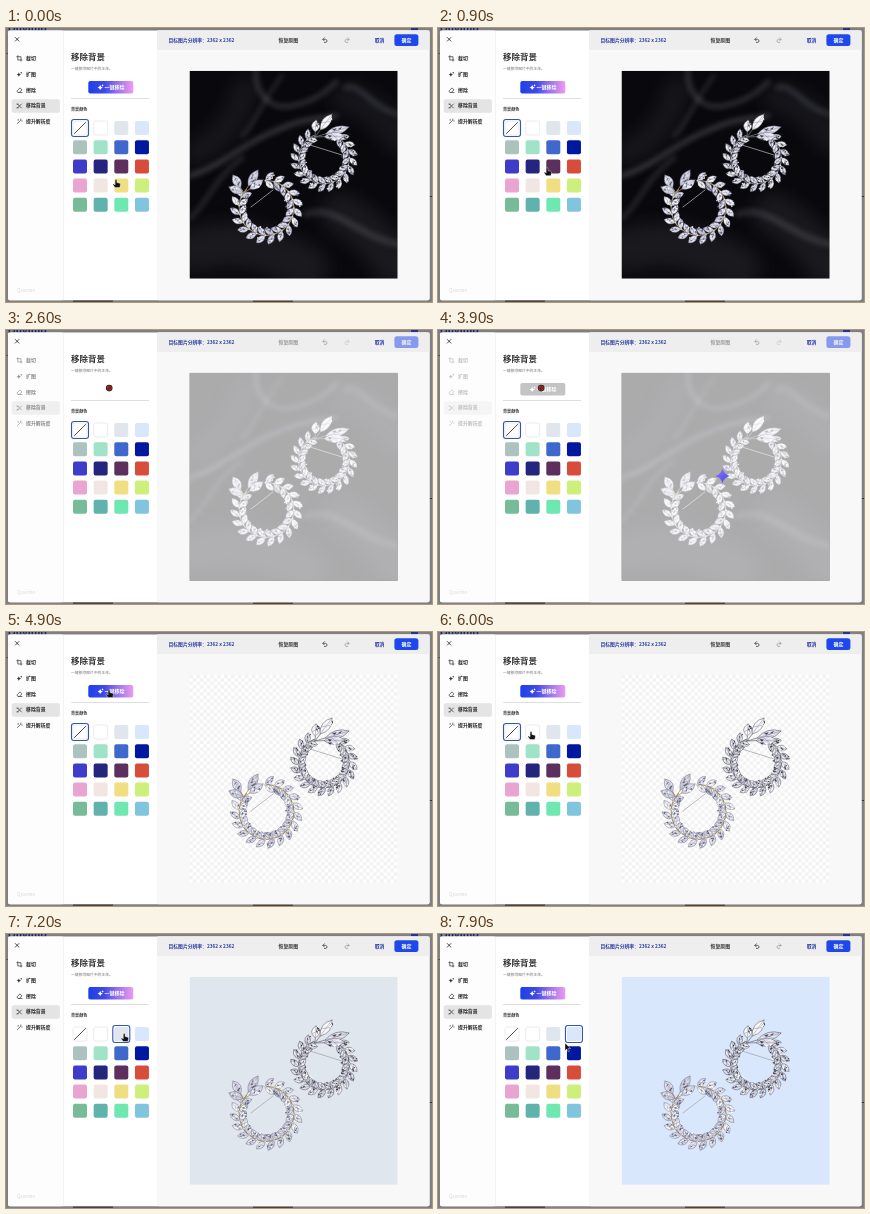
Recreate the animation shown at these times as an HTML page. Size 426 by 274 pixels, loop 8 s.

```html
<!DOCTYPE html>
<html lang="zh-CN">
<head>
<meta charset="utf-8">
<style>
html, body { margin: 0; width: 100%; height: 100%; overflow: hidden; background: #808080; }
svg { display: block; width: 100vw; height: 100vh; }
text { font-family: "Noto Sans CJK SC", "Noto Sans CJK", "Noto Sans", sans-serif; }
</style>
</head>
<body>
<svg id="stage" viewBox="0 0 426 274"></svg>
<script>
const LOOP = 8000;
const BUSY = [2500, 4600];
const COLORS = ['none', '#ffffff', '#e0e6ee', '#d9e7fc',
  '#acc2be', '#a0e3c8', '#3f68cc', '#0018a0',
  '#3d3dca', '#25257f', '#5c2f5f', '#d84c3a',
  '#e9a5cf', '#f1e6e2', '#f0de83', '#cdef7c',
  '#78bb98', '#60b3ad', '#6ee8b0', '#80c4de'];
// time, chosen swatch
const PICKS = [[0, 0], [6200, 1], [7100, 2], [7500, 3]];
// time, x, y of the pointer tip
const POINTER = [[0, 110, 151.5], [700, 110, 151.5], [1600, 103, 57.5], [5200, 103, 57.5],
  [6000, 93, 99.5], [6400, 93, 99.5], [6800, 113, 99.5], [7100, 113, 99.5],
  [7400, 133, 99.5], [7600, 133, 99.5], [7900, 127, 109]];

let seed = 7;
const rand = () => (seed = (seed * 16807) % 2147483647) / 2147483647;
const rad = d => d * Math.PI / 180;
const rect = (x, y, w, h, fill, r = 0, more = '') =>
  `<rect x="${x}" y="${y}" width="${w}" height="${h}" fill="${fill}" rx="${r}" ${more}/>`;
const photo = (fill, more = '') => rect(183.5, 42.8, 208.2, 207.9, fill, 0, more);
const label = (s, x, y, size, fill = '#333', weight = 700) =>
  `<text x="${x}" y="${y + size * .37}" font-size="${size}" fill="${fill}" font-weight="${weight}">${s}</text>`;
const line = (d, color = '#333', w = .7, more = '') =>
  `<path d="${d}" fill="none" stroke="${color}" stroke-width="${w}" stroke-linecap="round" stroke-linejoin="round" ${more}/>`;
const star = (x, y, r, fill) => {
  const q = r * .2;
  return `<path transform="translate(${x} ${y})" fill="${fill}" d="M0 ${-r}Q${q} ${-q} ${r} 0Q${q} ${q} 0 ${r}Q${-q} ${q} ${-r} 0Q${-q} ${-q} 0 ${-r}Z"/>`;
};

// A marquise stone with random facets
function leaf(x, y, angle, len, wide, dark) {
  const body = `M0 0Q${len / 2} ${-wide} ${len} 0Q${len / 2} ${wide} 0 0Z`;
  const tone = ['#e6e6f0', '#f6f6fa', '#cfcfde', '#dcdcec'][Math.floor(rand() * 4)];
  let out = `<path d="${body}" fill="${tone}" stroke="${dark}" stroke-width=".4"/>`;
  for (let i = 0; i < 7; i++) {
    const u = len * (.15 + rand() * .6), v = wide * (rand() - .5) * .6;
    const fill = rand() < .5 ? '#fff' : dark;
    out += `<path d="M${u} ${v}l${len * .2} ${wide * (rand() - .5) * .4}l${-len * .1} ${wide * .25}Z" fill="${fill}" opacity=".9"/>`;
  }
  out += line(`M${len * .1} 0H${len * .9}M${len * .35} ${-wide * .35}L${len * .65} ${wide * .35}`, dark, .25);
  return `<g transform="translate(${x} ${y}) rotate(${angle})">${out}</g>`;
}

function wreath({ cx, cy, r, from, to, len, dark, stem, root, tips, pin }) {
  const at = a => [cx + r * Math.cos(rad(a)), cy + r * Math.sin(rad(a))];
  let out = line(`M${at(from)}A${r} ${r} 0 1 1 ${at(to)}L${root}`, stem, 1.2) + line(pin, '#a9a9ae', .8);
  const count = 17;
  for (let i = 0; i < count; i++) {
    const a = from + (to - from) * i / count, [x, y] = at(a);
    out += leaf(x, y, a + 46, len, len * .52, dark);
    out += leaf(x, y, a + 136, len * .95, len * .5, dark);
    out += `<circle cx="${x}" cy="${y}" r=".9" fill="#eee" stroke="${stem}" stroke-width=".4"/>`;
  }
  for (const [x, y] of tips) {
    const dx = x - root[0], dy = y - root[1], size = Math.hypot(dx, dy);
    const k = size > 17 ? .3 : .08;
    out += line(`M${root}L${x} ${y}`, stem, .8);
    out += leaf(root[0] + dx * k, root[1] + dy * k, Math.atan2(dy, dx) * 180 / Math.PI, size * (1 - k), 8.2, dark);
  }
  return out;
}

const jewels = () => wreath({
  cx: 318, cy: 130.5, r: 25.2, from: -55, to: 246, len: 11, dark: '#34343f', stem: '#77777f',
  root: [309, 109], tips: [[326, 86], [343, 99], [310, 92], [339, 108]],
  pin: 'M304 117L336 127'
}) + wreath({
  cx: 260.5, cy: 180, r: 27.3, from: -92, to: 222, len: 11.6, dark: '#5c5c72', stem: '#a8906a',
  root: [238, 165], tips: [[252, 142], [227, 147], [257, 152], [223, 159]],
  pin: 'M245 179L267 162'
});

// path, width, opacity: broad sheen, then narrow ridges
const SHEEN = [
  ['M190 222Q240 205 300 240', 44, .09],
  ['M335 185Q365 200 391 240', 40, .09],
  ['M190 125Q225 110 240 60', 26, .07],
  ['M340 70Q370 75 391 110', 30, .07]];
const RIDGES = [
  ['M184 148C215 138 235 118 262 106S295 92 330 88', 5, .22],
  ['M236 108C252 92 258 70 276 48', 4, .14],
  ['M250 43C248 62 262 82 284 78S318 66 330 54', 5, .18],
  ['M184 190C200 178 208 150 236 130', 5, .14],
  ['M340 60C352 52 365 80 391 86', 6, .14],
  ['M300 186C330 176 345 205 391 216', 7, .14]];
const folds = (list, blur) => `<g filter="url(#${blur})">` +
  list.map(([d, w, o]) => line(d, '#c4c4d4', w, `opacity="${o}"`)).join('') + '</g>';
const silk = () => photo('#09090d') + folds(SHEEN, 'soft') + folds(RIDGES, 'fine');

const ICONS = [
  line('M11.8 27.7V32H16M10.8 28.7H15V33'),
  star(12.8, 46.6, 2.2, '#333') + star(15.2, 44.8, 1.1, '#333'),
  line('M11.2 62.7L14 59.9L16 61.9L13.2 64.5H12.3ZM13 64.5H16'),
  line('M11.5 76L15.5 80M15.5 76L11.5 80M11 76.2H12.3M11 79.8H12.3'),
  line('M11.5 95.5L14.2 92.7M14.8 91V92.2M15.8 93H16.2M12.2 91.5V92.3')];
const MENU = ['裁切', '扩图', '擦除', '移除背景', '提升解析度'];
const menuY = i => 30.4 + i * 15.75;

const swatchAt = i => [67 + (i % 4) * 20.65, 93 + Math.floor(i / 4) * 19.2];
const swatches = () => COLORS.map((c, i) => {
  const [x, y] = swatchAt(i);
  const edge = i < 2 ? 'stroke="#dedee2" stroke-width=".6"' : '';
  return rect(x, y, 14, 14, i ? c : '#fff', 2, edge) +
    (i ? '' : line(`M${x + 1.5} ${y + 12.5}L${x + 12.5} ${y + 1.5}`, '#222', .8));
}).join('');

const button = (id, fill) => `<g id="${id}">` + rect(82.3, 53, 45, 12.5, fill, 2) +
  star(94.2, 59.5, 2.6, '#fff') + star(96.6, 57.4, 1.1, '#fff') +
  label('一键移除', 98.5, 59.1, 5, '#fff') + '</g>';

const stage = document.getElementById('stage');
stage.innerHTML = `
<defs>
  <linearGradient id="glow"><stop offset="0" stop-color="#1c40e8"/><stop offset=".35" stop-color="#3f48e8"/><stop offset=".62" stop-color="#8f70ea"/><stop offset="1" stop-color="#f09aee"/></linearGradient>
  <linearGradient id="spark" x2="1" y2="1"><stop offset="0" stop-color="#a070f0"/><stop offset="1" stop-color="#2f4cf0"/></linearGradient>
  <filter id="soft" x="-40%" y="-40%" width="180%" height="180%"><feGaussianBlur stdDeviation="9"/></filter>
  <filter id="fine" x="-20%" y="-20%" width="140%" height="140%"><feGaussianBlur stdDeviation="2.6"/></filter>
  <clipPath id="frame">${photo('#000')}</clipPath>
  <pattern id="check" x="183.5" y="42.8" width="6.93" height="6.93" patternUnits="userSpaceOnUse">
    ${rect(0, 0, 6.93, 6.93, '#fff') + rect(0, 0, 3.465, 3.465, '#f2f2f2') + rect(3.465, 3.465, 3.465, 3.465, '#f2f2f2')}
  </pattern>
</defs>
${rect(0, 0, 426, 274, '#808080')}
${label('Quvimo', 2, .2, 10, '#17256f')}
${rect(405, 0, 7, 3, '#22368f')}
${rect(67, 271, 40, 3, '#4b4542') + rect(247, 271, 40, 3, '#4d4338')}
${rect(0, 25, 2, 1, '#555') + rect(423, 168, 3, 1, '#333')}
${rect(2, 2.5, 421.5, 269.8, '#fff', 2)}
${rect(2, 2.5, 55.5, 269.8, '#fdfdfd', 2) + rect(57, 2.5, .6, 269.8, '#ececec')}
${rect(151, 2.5, 272.5, 269.8, '#f8f8f8', 2) + rect(151, 2.5, 272.5, 19.5, '#eeeeef')}
${line('M9.3 9.5L12.9 13.1M12.9 9.5L9.3 13.1', '#222', .8)}
<g id="menu">
  ${rect(5.7, 71.2, 48.2, 13.6, '#e4e4e4', 2)}
  ${MENU.map((s, i) => ICONS[i] + label(s, 20, menuY(i), 4.9, '#222')).join('')}
</g>
${label('Quvimo', 11, 262, 5, '#d8d8d8', 400)}
${label('移除背景', 65, 29.3, 8.5)}
${label('一键移除图片中的主体。', 65, 40.3, 3.8, '#777', 400)}
${button('ready', 'url(#glow)') + button('off', '#c4c4c4')}
${rect(65, 70, 78, 1, '#dedede')}
${label('背景颜色', 65, 81.8, 4.1)}
${swatches()}
<rect id="ring" width="17" height="17" rx="2.5" fill="none" stroke="#3454b8" stroke-width="1.1"/>
${label('目标图片分辨率：2362 x 2362', 162.5, 12, 4.8, '#2b3da4')}
<g id="tools">
  ${label('恢复原图', 272.5, 12, 4.9)}
  ${line('M318.5 9.7L316.8 11.4L318.5 13.1M317 11.4H319.8A1.6 1.6 0 0 1 319.8 14.5H318.5')}
  ${line('M341.5 9.7L343.2 11.4L341.5 13.1M343 11.4H340.2A1.6 1.6 0 0 0 340.2 14.5H341.5', '#999')}
</g>
${label('取消', 368.7, 12, 4.9, '#2b3da4')}
<g id="confirm">${rect(388.4, 6.2, 24, 11.8, '#1f48ea', 2.5) + label('确定', 395.4, 12, 5, '#fff')}</g>
<g clip-path="url(#frame)">
  ${photo('#fff', 'id="back"')}
  <g id="silk">${silk()}</g>
  ${jewels()}
  ${photo('#fff', 'id="veil"')}
</g>
<g id="spinner">${star(0, 0, 7.2, 'url(#spark)') + star(4, -8, 2, '#d9b6ee')}</g>
<g id="cursor">
  <path id="hand" d="M-.9 .6Q0 -.6 .9 .6V3L3.6 3.7Q4.6 4 4.4 5.4L3.7 8H-1L-3 5.2Q-3.2 4.2 -2.1 4.5L-.9 5.4Z" fill="#111" stroke="#fff" stroke-width=".4"/>
  <path id="arrow" d="M0 0V7.6L1.9 6L3.2 8.8L4.5 8.2L3.2 5.5H5.6Z" fill="#111" stroke="#fff" stroke-width=".4"/>
  <g id="stop"><circle cx=".2" cy=".6" r="3.3" fill="#2b1614"/><circle cx=".2" cy=".6" r="2.2" fill="#46201d" stroke="#b5332c" stroke-width=".9"/>${line('M-1.3 -.9L1.7 2.1', '#b5332c', .9)}</g>
</g>`;

const $ = id => document.getElementById(id);
const set = (id, attrs) => { for (const k in attrs) $(id).setAttribute(k, attrs[k]); };
const show = (id, on) => set(id, { opacity: +on });
const clamp = v => Math.max(0, Math.min(1, v));
const ease = u => u * u * (3 - 2 * u);

function pointerAt(t) {
  let i = 0;
  while (i < POINTER.length - 2 && t >= POINTER[i + 1][0]) i++;
  const [t0, x0, y0] = POINTER[i], [t1, x1, y1] = POINTER[i + 1];
  const u = ease(clamp((t - t0) / (t1 - t0)));
  return [x0 + (x1 - x0) * u, y0 + (y1 - y0) * u];
}

function overTarget(x, y) {
  if (x > 82 && x < 128 && y > 52 && y < 66) return true;
  return COLORS.some((c, i) => {
    const [sx, sy] = swatchAt(i);
    return x >= sx && x <= sx + 14 && y >= sy && y <= sy + 14;
  });
}

function draw(t) {
  const busy = t >= BUSY[0] && t < BUSY[1];
  const done = t >= BUSY[1];
  const since = t - BUSY[0];
  show('ready', !busy);
  set('off', { opacity: busy ? clamp((since - 100) / 300) : 0 });
  set('menu', { opacity: busy ? 1 - .72 * clamp((since + 100) / 300) : 1 });
  set('tools', { opacity: busy ? .45 : 1 });
  set('confirm', { opacity: busy ? .5 : 1 });
  set('veil', { opacity: busy ? .66 : 0 });
  show('silk', !done);

  const pulse = 1 + .15 * Math.sin((t - 3900) / 1000 * Math.PI * 2);
  set('spinner', {
    opacity: busy ? clamp((since - 200) / 300) : 0,
    transform: `translate(284.5 146) scale(${pulse})`
  });

  const pick = PICKS.filter(p => t >= p[0]).pop()[1];
  const [sx, sy] = swatchAt(pick);
  set('ring', { x: sx - 1.5, y: sy - 1.5 });
  set('back', { fill: pick ? COLORS[pick] : 'url(#check)' });

  const [x, y] = pointerAt(t), over = overTarget(x, y);
  set('cursor', { transform: `translate(${x} ${y})` });
  show('stop', busy);
  show('hand', !busy && over);
  show('arrow', !busy && !over);
}

function tick() {
  draw(Math.floor(performance.now() % LOOP / 100) * 100);
  requestAnimationFrame(tick);
}
tick();
</script>
</body>
</html>
```
